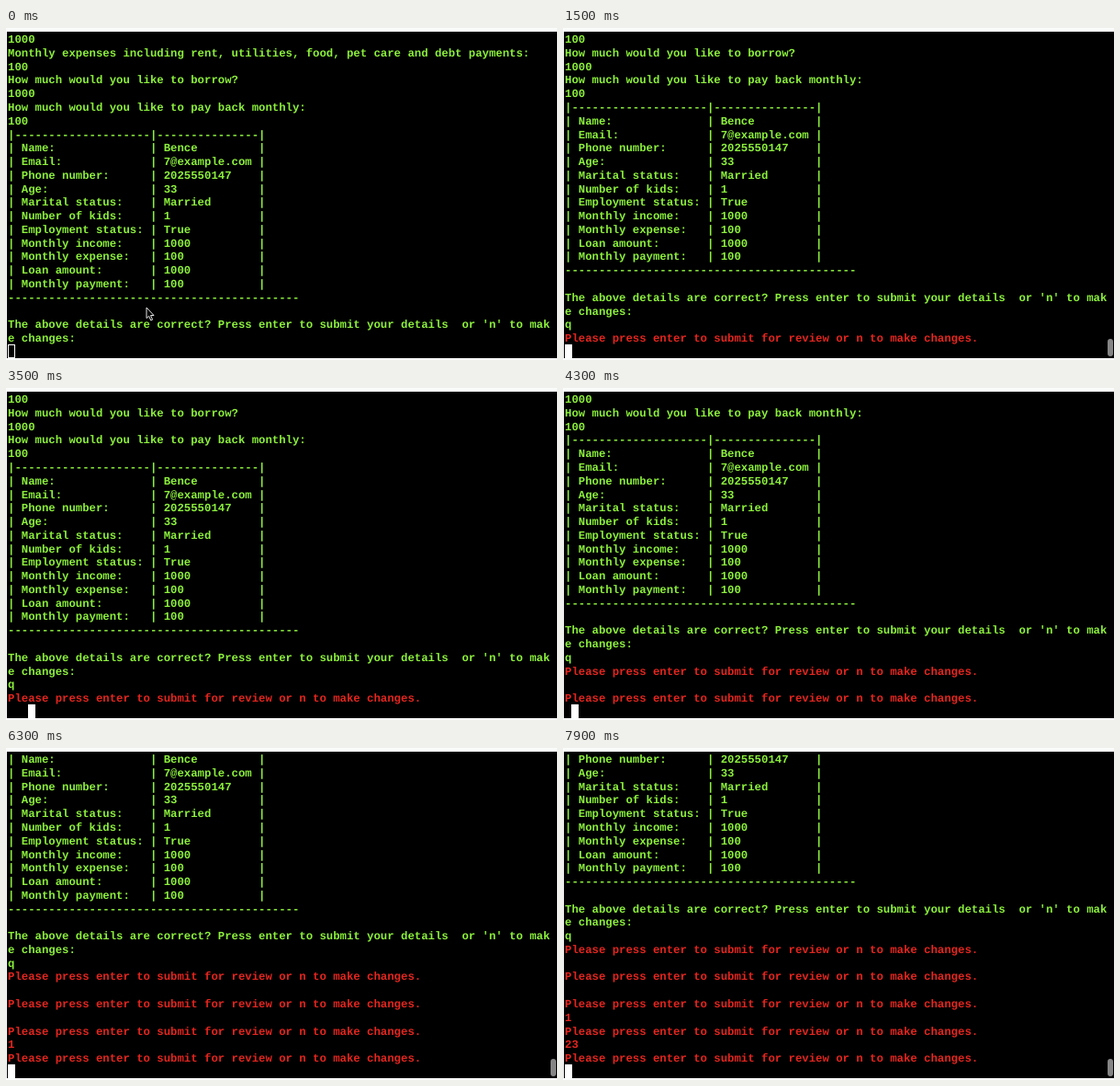
An HTML page that plays this animation: 600 by 361 pixels, repeating every 8000 ms.

```html
<!DOCTYPE html>
<html lang="en">
<head>
<meta charset="utf-8">
<title>Terminal form</title>
<style>
  html, body { margin: 0; width: 100%; height: 100%; overflow: hidden; background: #fbfdfc; }
  #stage { position: relative; width: 600px; height: 361px; overflow: hidden; }
  #stage > * { position: absolute; }
  #screen { left: 1px; top: 4px; width: 599px; height: 355px; background: #000; }
  #text {
    left: 2px; top: 6.2px; margin: 0; color: #8cf03c;
    font: bold 12.31px/14.77px "Liberation Mono", "Courier New", monospace;
    text-rendering: geometricPrecision; white-space: pre;
  }
  #text .red { color: #e4251f; }
  #cursor { top: 344px; width: 8px; height: 15px; box-sizing: border-box; border: 1px solid #fff; }
  #bar { left: 593px; top: 338px; width: 6px; height: 19px; border-radius: 3px; background: #858585; }
  #pointer { left: 152px; top: 303px; }
</style>
</head>
<body>
<div id="stage">
  <div id="screen"></div>
  <div id="cursor"></div>
  <pre id="text"></pre>
  <div id="bar"></div>
  <svg id="pointer" width="11" height="17">
    <path d="M1 1V12.6L3.6 10.2L5.8 15L7.6 14.2L5.5 9.5H9Z" fill="#000" stroke="#e4e4e4"/>
  </svg>
</div>
<script>
const LOOP = 8000, ROWS = 24, CELL = 7.387;
const FOCUS = 400, HIDE_POINTER = 800, BAR_HOLD = 420, BAR_FADE = 160;
const ERROR = "Please press enter to submit for review or n to make changes.";

const row = ([label, value]) => `| ${label.padEnd(18)} | ${value.padEnd(13)} |`;
const intro = [
  "1000",
  "Monthly expenses including rent, utilities, food, pet care and debt payments:",
  "100",
  "How much would you like to borrow?",
  "1000",
  "How much would you like to pay back monthly:",
  "100",
  `|${"-".repeat(20)}|${"-".repeat(15)}|`,
  ...[
    ["Name:", "Bence"], ["Email:", "7@example.com"], ["Phone number:", "2025550147"],
    ["Age:", "33"], ["Marital status:", "Married"], ["Number of kids:", "1"],
    ["Employment status:", "True"], ["Monthly income:", "1000"], ["Monthly expense:", "100"],
    ["Loan amount:", "1000"], ["Monthly payment:", "100"]
  ].map(row),
  "-".repeat(43),
  "",
  "The above details are correct? Press enter to submit your details  or 'n' to mak",
  "e changes:"
];

// Key presses as [time, key]; "\n" submits the line and prints the error.
const keys = [
  [800, "q"], [1200, "\n"],
  [2100, " "], [2600, " "], [3100, " "], [3600, "\n"],
  [4100, " "], [4500, "\n"],
  [5300, "1"], [6200, "\n"],
  [6900, "2"], [7300, "3"], [7700, "\n"]
];

const $ = id => document.getElementById(id);
const text = $("text"), cursor = $("cursor"), bar = $("bar"), pointer = $("pointer");
let shown = -1;

function drawText(count) {
  const lines = [...intro];
  let input = "", red = false;
  const add = s => lines.push(red ? `<span class="red">${s}</span>` : s);
  for (const [, key] of keys.slice(0, count)) {
    if (key !== "\n") { input += key; continue; }
    add(input);
    input = "";
    red = true;
    add(ERROR);
  }
  add(input);
  text.innerHTML = lines.slice(-ROWS).join("\n");
  cursor.style.left = Math.round(1.6 + input.length * CELL) + "px";
}

function frame(now) {
  const t = now % LOOP;
  const past = keys.filter(([at]) => at <= t);
  if (past.length !== shown) drawText(shown = past.length);

  const lastScroll = Math.max(-LOOP, ...past.filter(k => k[1] === "\n").map(k => k[0]));
  const fade = 1 - (t - lastScroll - BAR_HOLD) / BAR_FADE;
  bar.style.opacity = Math.max(0, Math.min(1, fade));
  cursor.style.background = t < FOCUS ? "none" : "#fff";
  pointer.style.display = t < HIDE_POINTER ? "block" : "none";
  requestAnimationFrame(frame);
}
frame(0);
</script>
</body>
</html>
```
